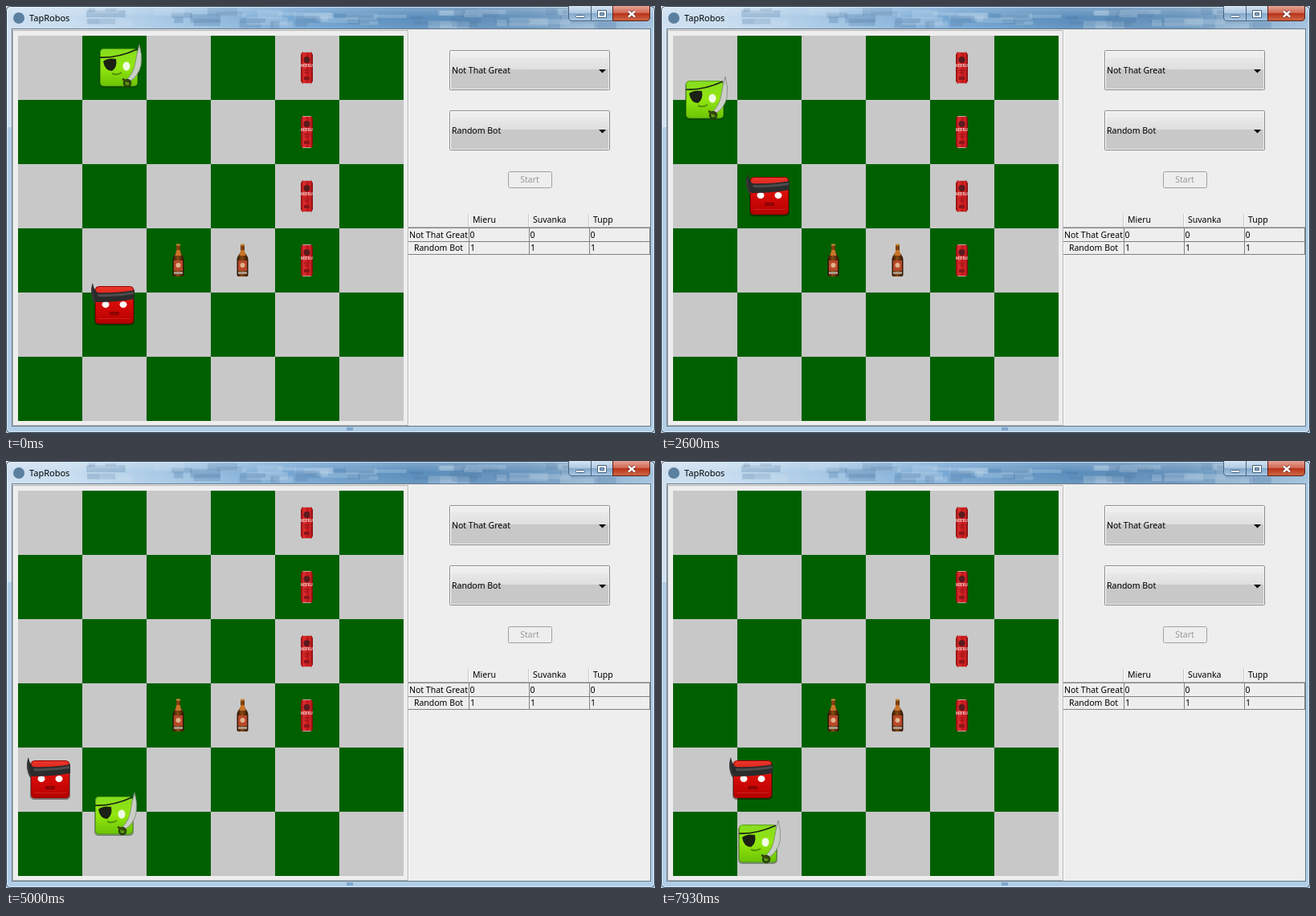
An HTML page that plays this animation: 808x532 px, repeating every 8 s.

```html
<!DOCTYPE html>
<html lang="en">
<head>
<meta charset="utf-8">
<title>TapRobos</title>
<style>
  html, body { margin: 0; width: 100%; height: 100%; overflow: hidden; background: #b2cee7; }
  svg { display: block; width: 808px; height: 532px; }
  text { font: 10.5px "Noto Sans", "Open Sans", sans-serif; fill: #000; }
</style>
</head>
<body>
<svg viewBox="0 0 808 532">
  <defs>
    <linearGradient id="glass">
      <stop offset="0" stop-color="#c9dcee"/><stop offset=".1" stop-color="#c3daee"/>
      <stop offset=".3" stop-color="#94bcdf"/><stop offset=".45" stop-color="#6a9fcf"/>
      <stop offset=".62" stop-color="#4f86b8"/><stop offset=".8" stop-color="#5c8bb6"/>
      <stop offset="1" stop-color="#9dbedb"/>
    </linearGradient>
    <linearGradient id="shine" x2="0" y2="1">
      <stop offset="0" stop-color="#fff" stop-opacity=".3"/>
      <stop offset=".5" stop-color="#fff" stop-opacity=".06"/>
      <stop offset="1" stop-color="#fff" stop-opacity=".15"/>
    </linearGradient>
    <linearGradient id="close" x2="0" y2="1">
      <stop offset="0" stop-color="#e6a397"/><stop offset=".48" stop-color="#cf6650"/>
      <stop offset=".5" stop-color="#b83217"/><stop offset="1" stop-color="#cf6a48"/>
    </linearGradient>
    <linearGradient id="caption" x2="0" y2="1">
      <stop offset="0" stop-color="#d5e4f2"/><stop offset=".48" stop-color="#aec8e0"/>
      <stop offset=".5" stop-color="#83a8cb"/><stop offset="1" stop-color="#a9c8e4"/>
    </linearGradient>
    <linearGradient id="combo" x2="0" y2="1">
      <stop offset="0" stop-color="#e9e9e9"/><stop offset="1" stop-color="#dedede"/>
    </linearGradient>
    <linearGradient id="lime" x2="0" y2="1">
      <stop offset="0" stop-color="#86dc20"/><stop offset=".5" stop-color="#92e60e"/>
      <stop offset="1" stop-color="#6cc406"/>
    </linearGradient>
    <linearGradient id="scarlet" x2="0" y2="1">
      <stop offset="0" stop-color="#e8382c"/><stop offset=".45" stop-color="#d80c08"/>
      <stop offset="1" stop-color="#b40000"/>
    </linearGradient>
    <linearGradient id="tin">
      <stop offset="0" stop-color="#8a0a0e"/><stop offset=".25" stop-color="#e0302f"/>
      <stop offset=".55" stop-color="#c0161a"/><stop offset=".8" stop-color="#d42426"/>
      <stop offset="1" stop-color="#74060a"/>
    </linearGradient>
    <linearGradient id="amber">
      <stop offset="0" stop-color="#2a1204"/><stop offset=".45" stop-color="#8a4a12"/>
      <stop offset="1" stop-color="#2a1204"/>
    </linearGradient>

    <g id="can">
      <path d="M-5.500-20H5.500L7.500-16.500V16.500L5.500 20H-5.500L-7.500 16.500V-16.500Z" fill="url(#tin)"/>
      <path d="M-5-19.500H5M-5 19.500H5" stroke="#c4a8a4"/>
      <circle cy="-10" r="4" fill="#5a1a1e"/>
      <text y="-1" text-anchor="middle" style="font-size:4.500px;font-weight:700;fill:#efd0cc">MIERU</text>
      <path d="M-4 3H4M-3 6H3" stroke="#8d1519"/>
      <rect x="-3.500" y="11" width="7" height="4" fill="#8d1519"/>
    </g>
    <g id="bottle">
      <path d="M-2.500-20H2.500V-10Q7-5 7-1V18Q7 20 5 20H-5Q-7 20-7 18V-1Q-7-5-2.500-10Z" fill="url(#amber)"/>
      <path d="M-2.500-19.500H2.500" stroke="#c98a3a" stroke-width="2"/>
      <path d="M-2-13H2L4-6H-4Z" fill="#c87428"/>
      <rect x="-5.500" y="0" width="11" height="13" fill="#b8482a"/>
      <circle cy="6" r="3" fill="#e0b48c"/>
      <rect x="-5.500" y="14" width="11" height="3" fill="#a89888"/>
    </g>
    <g id="pirate">
      <rect x="-1" y="1" width="49" height="48" rx="5" fill="#123d00" opacity=".45"/>
      <rect x=".5" y=".5" width="46" height="46" rx="4" fill="url(#lime)" stroke="#58a60c"/>
      <path d="M0 11Q22 12 46 1" fill="none" stroke="#182010" stroke-width="1.600"/>
      <path d="M4 16Q10 11 20 13Q22 23 15 28Q6 28 4 16Z" fill="#1b2114"/>
      <ellipse cx="33" cy="22" rx="4.500" ry="5.500" fill="#f0fbe4"/>
      <path d="M15 31Q21 34 27 30" fill="none" stroke="#4f9208" stroke-width="2"/>
      <path d="M49-5Q53 8 51 21Q48 34 37 41L34 38Q42 30 44 18Q46 5 49-5Z" fill="#c9cfc6" stroke="#7c837b" stroke-width=".8"/>
      <circle cx="34" cy="43" r="4" fill="#5c9a16" stroke="#27400a" stroke-width="2.500"/>
      <path d="M28 38L39 43" stroke="#39470f" stroke-width="2.500"/>
    </g>
    <g id="ninja">
      <rect x="-1" y="1" width="50" height="48" rx="5" fill="#200" opacity=".45"/>
      <rect x=".5" y=".5" width="47" height="46" rx="4" fill="url(#scarlet)" stroke="#900"/>
      <path d="M4 40.500H44" stroke="#d9382f" opacity=".6"/>
      <ellipse cx="13" cy="23" rx="4.500" ry="4" fill="#fff"/>
      <ellipse cx="35" cy="23" rx="4.500" ry="4" fill="#fff"/>
      <path d="M-3-4Q-2 4 3 8Q25 9 49 5V16Q28 20 2 20Q-4 17-5 8Q-5 0-3-4Z" fill="#2b2b2b"/>
      <path d="M3 10Q26 11 48 7V10Q26 14 4 13Z" fill="#4c4c4c"/>
      <path d="M-4 3Q-4 16 0 21" fill="none" stroke="#3b3b3b" stroke-width="2"/>
      <rect x="18.500" y="32.500" width="11" height="3" rx="1.500" fill="#980a06" stroke="#7a0000"/>
    </g>
  </defs>

  <!-- window frame -->
  <rect width="808" height="532" fill="#b2cee7"/>
  <rect width="808" height="29" fill="url(#glass)"/>
  <g id="clouds"></g>
  <rect width="808" height="29" fill="url(#shine)"/>
  <rect y="29" width="7" height="122" fill="#d3e2f0"/>
  <rect x="424" y="525" width="8" height="4" fill="#7fa6cb"/>
  <rect x=".5" y=".5" width="807" height="531" rx="5" fill="none" stroke="#2c3c4c"/>
  <rect x="1.500" y="1.500" width="805" height="529" rx="4" fill="none" stroke="#e7f2fb" stroke-opacity=".75"/>
  <circle cx="16" cy="15" r="7" fill="#5b7f9f"/>
  <text x="29" y="19" style="font-size:11px">TapRobos</text>
  <g stroke="#46627e">
    <path d="M700.500 0V14Q700.500 18.500 705 18.500H728.500V0M728.500 0V18.500H755.500V0" fill="url(#caption)"/>
    <path d="M755.500 0V18.500H797Q801.500 18.500 801.500 14V0" fill="url(#close)" stroke="#5b2018"/>
    <rect x="709.500" y="11.500" width="11" height="3" rx="1" fill="#fff"/>
    <path d="M736.500 5.500H747.500V14.500H736.500ZM739.500 8.500V11.500H744.500V8.500Z" fill="#fff" fill-rule="evenodd"/>
  </g>
  <path d="M775 6.500L783 13.500M783 6.500L775 13.500" stroke="#6a2a24" stroke-width="4"/>
  <path d="M775 6.500L783 13.500M783 6.500L775 13.500" stroke="#fff" stroke-width="2.400"/>
  <rect x="7.500" y="28.500" width="795" height="495" fill="#eee" stroke="#66788a"/>
  <path d="M8.500 522.500V30.500H500.500V522.500Z" fill="none" stroke="#b4b4b4"/>
  <path d="M501.500 30V522" stroke="#fff"/>

  <g id="board"></g>
  <g id="panel"></g>
  <use id="red" href="#ninja"/>
  <use id="green" href="#pirate"/>
</svg>

<script>
const byId = id => document.getElementById(id);
const rect = (x, y, w, h, fill, more = '') =>
  `<rect x="${x}" y="${y}" width="${w}" height="${h}" fill="${fill}" ${more}/>`;
const label = (x, y, words, more = '') => `<text x="${x}" y="${y}" ${more}>${words}</text>`;
const line = (d, color) => `<path d="${d}" stroke="${color}" fill="none"/>`;
const CELL = 80;

function drawClouds() {
  let seed = 7, out = '';
  const random = () => (seed = seed * 16807 % 2147483647) / 2147483647;
  for (let i = 0; i < 60; i++) {
    const x = 100 + random() * 640, w = 8 + random() * 44;
    const color = random() < .55 ? '#3a6a98' : '#c3d8ea';
    out += rect(x, 1 + random() * 20, w, 3 + random() * 8, color, 'opacity=".28"');
  }
  byId('clouds').innerHTML = out;
}

function drawBoard() {
  let out = rect(15, 37, 480, 480, '#c8c8c8');
  for (let i = 0; i < 36; i++) {
    const col = i % 6, row = Math.floor(i / 6);
    if ((col + row) % 2) out += rect(15 + col * CELL, 37 + row * CELL, CELL, CELL, '#006000');
  }
  const item = (name, col, row) =>
    `<use href="#${name}" x="${55 + col * CELL - .5}" y="${77 + row * CELL}"/>`;
  for (let row = 0; row < 4; row++) out += item('can', 4, row);
  byId('board').innerHTML = out + item('bottle', 2, 3) + item('bottle', 3, 3);
}

function drawCombo(y, words) {
  return rect(552.5, y + .5, 199, 49, '#eee', 'rx="1" stroke="#8c8c8c"')
    + rect(554, y + 9, 196, 16, 'url(#combo)') + rect(554, y + 24, 196, 24, '#c8c8c8')
    + line(`M553.5 ${y + 48}V${y + 1.5}H750`, '#fff')
    + `<path d="M738 ${y + 24}h9l-4.500 4.500z"/>`
    + label(555, y + 29, words);
}

function drawPanel() {
  let out = drawCombo(55, 'Not That Great') + drawCombo(130, 'Random Bot')
    + rect(625.5, 206.5, 54, 20, '#eee', 'rx="2" stroke="#a0a0a0"')
    + label(652, 220, 'Start', 'text-anchor="middle" style="fill:#999"')
    + line('M501 275.5H802', '#b8b8b8')
    + line('M501 276.5H802M501 293.5H802M501 309.5H802M576.5 276V310M651.5 276V310M726.5 276V310M801.5 276V310', '#808080')
    + label(502, 289, 'Not That Great') + label(538.5, 305, 'Random Bot', 'text-anchor="middle"');
  ['Mieru', 'Suvanka', 'Tupp'].forEach((name, i) => {
    const x = 576 + 75 * i;
    out += line(`M${x - .5} 259V275`, '#c8c8c8') + line(`M${x + .5} 259V275`, '#fff')
      + label(x + 5, 270, name) + label(x + 1.5, 289, '0') + label(x + 2, 305, '1');
  });
  byId('panel').innerHTML = out;
}

// A bot walks one cell per move; keys pin some moves to their starting tick.
const STEP = { U: [0, -1], D: [0, 1], L: [-1, 0], R: [1, 0] };
const bots = [
  { node: byId('green'), home: [2, 0], moves: 'LLRDLDUUDDRDDUDDRRLLLRLRL',
    keys: [[0, -4.1], [4, 15.95], [8, 36.8], [13, 62.06], [17, 82.9], [21, 102.56], [24, 118.2]] },
  { node: byId('red'), home: [1, 4], moves: 'UUDUUUDDULDDDDUUDDUDUDUR',
    keys: [[0, -1.33], [3, 13.95], [8, 39.5], [12, 59.8], [17, 85.1], [20, 100.4], [23, 115.7]] }
];
const TICKS_PER_MS = .015, SPEED = 18;

function startOf(move, keys) {
  const next = Math.max(1, keys.findIndex(key => key[0] >= move));
  const [a, from] = keys[next - 1], [b, to] = keys[next];
  return from + (to - from) * (move - a) / (b - a);
}

function place({ node, home, moves, keys }, tick) {
  let x = 31 + home[0] * CELL, y = 53 + home[1] * CELL;
  [...moves].forEach((move, i) => {
    const gone = Math.min(CELL, Math.max(0, (tick - startOf(i, keys)) * SPEED));
    x += STEP[move][0] * gone;
    y += STEP[move][1] * gone;
  });
  node.setAttribute('transform', `translate(${Math.round(x)} ${Math.round(y)})`);
}

function render() {
  const tick = Math.floor((performance.now() % 8000 + 4) * TICKS_PER_MS);
  bots.forEach(bot => place(bot, Math.min(tick, 119)));
  requestAnimationFrame(render);
}

drawClouds();
drawBoard();
drawPanel();
render();
</script>
</body>
</html>
```
